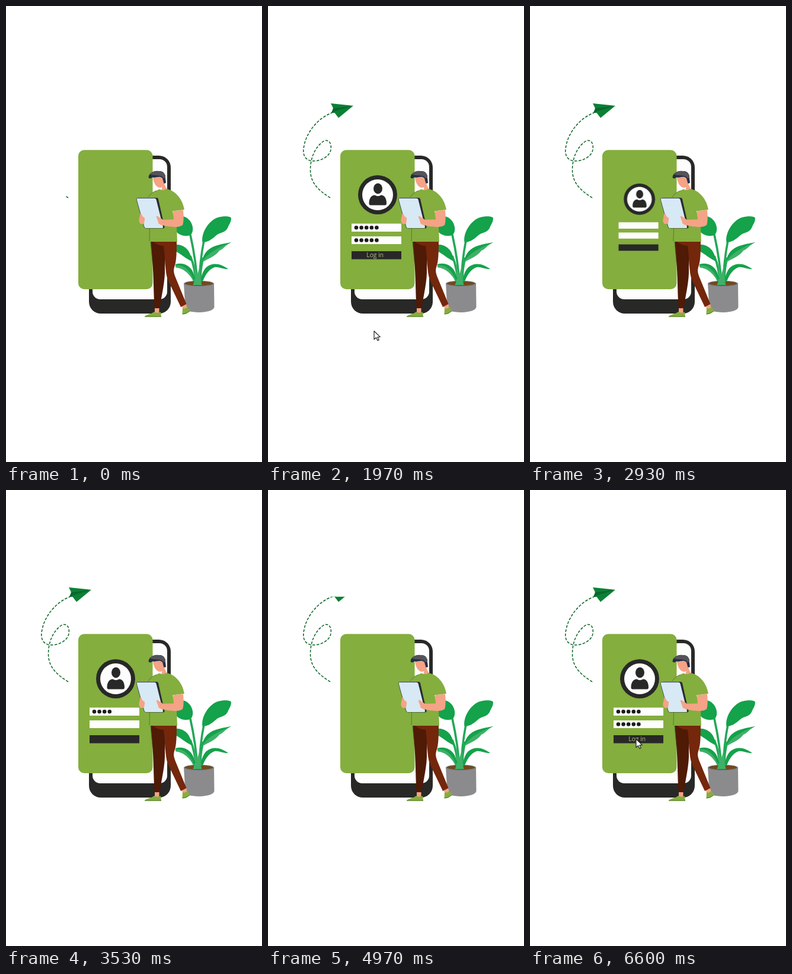
These frames come from a looping animation (432 px wide and 768 px high, 6.71 s). An HTML page without scripts:

```html
<!DOCTYPE html>
<html lang="en">
<head>
<meta charset="utf-8">
<title>Log in</title>
<style>
  html, body { margin: 0; width: 100%; height: 100%; overflow: hidden; background: #fff; }
  svg { display: block; width: 100%; height: 100%; }

  /* every moving part shares one cycle */
  .wipe, .form, .cover, .late, .cursor {
    animation: calc(6710ms / 3) linear infinite;
  }
  .wipe { animation-name: wipe; }
  .form { animation-name: zoom; transform-origin: 183.3px 355px; }
  .cover { transform-origin: 189px 0; animation-timing-function: step-end; }
  .user { animation-name: user; }
  .pass { animation-name: pass; }
  .late { animation-name: show; animation-timing-function: step-end; }
  .cursor { animation-name: rise; }

  @keyframes wipe {
    0%, 2% { transform: translateY(160.5px); }
    25.1%, 100% { transform: none; }
  }
  @keyframes zoom {
    0%, 25% { transform: scale(0); animation-timing-function: steps(5); }
    32.4%, 100% { transform: none; }
  }
  @keyframes user {
    0% { transform: none; }
    39.9% { transform: scaleX(.8); }
    47.1% { transform: scaleX(.6); }
    53.4% { transform: scaleX(.4); }
    57.8% { transform: scaleX(.2); }
    65.1%, 100% { transform: scaleX(0); }
  }
  @keyframes pass {
    0% { transform: none; }
    65.1% { transform: scaleX(.8); }
    71.3% { transform: scaleX(.6); }
    75.7% { transform: scaleX(.4); }
    83% { transform: scaleX(.2); }
    88%, 100% { transform: scaleX(0); }
  }
  @keyframes show {
    0% { opacity: 0; }
    88%, 100% { opacity: 1; }
  }
  @keyframes rise {
    0%, 88% { transform: translateY(128px); animation-timing-function: cubic-bezier(.76, 0, .24, 1); }
    95.3%, 100% { transform: none; }
  }

  .ink { fill: #282827; }
  .lime { fill: #84ae3e; }
  .skin { fill: #f4a386; }
  .leaf { fill: #14a24b; }
  .pale { fill: #3fb068; }
  .stem { fill: none; stroke: #22a857; stroke-width: 3.6; }
  .dots { fill: none; stroke: #1c1c1b; stroke-width: 6.6; stroke-linecap: round; stroke-dasharray: 0 8.6; }
  text { font: 10.3px "Open Sans", "Noto Sans", sans-serif; fill: #b0c484; text-anchor: middle; }
</style>
</head>
<body>
<svg viewBox="0 0 432 768">
  <defs>
    <clipPath id="reveal"><rect class="wipe" x="50" y="160" width="110" height="170"/></clipPath>
  </defs>

  <!-- paper plane and its trail -->
  <g clip-path="url(#reveal)">
    <path d="M105 323C88 312 71.500 300 71.500 276C71.500 255 80 238 92 229C101 222 108 230 106 242C104 254 88 262 74 261C60 259 58 247 61 235C65 213 84 188 110 179"
          fill="none" stroke="#0a6325" stroke-width="1.5" stroke-dasharray="4.5 2.5"/>
    <path d="M106 164L144 168L110 175L109.500 171Z" fill="#0b8035"/>
    <path d="M110 172.500L144 168L113 180L107 179.500Z" fill="#07682a"/>
    <path d="M111 178L144 168L119 188.500Z" fill="#0b8035"/>
  </g>

  <!-- phone and card -->
  <rect class="ink" x="140" y="252" width="138" height="266" rx="20"/>
  <rect x="146" y="258" width="126" height="236" rx="13" fill="#fdfdfd"/>
  <rect class="lime" x="122" y="242.500" width="125.500" height="234.500" rx="10"/>

  <!-- login form -->
  <g class="form">
    <circle class="ink" cx="185" cy="318" r="33"/>
    <circle cx="185" cy="318" r="26" fill="#fdfdfd"/>
    <ellipse class="ink" cx="185.500" cy="307.500" rx="7.500" ry="9"/>
    <path class="ink" d="M173 335.500Q170.500 335.500 170.500 332C170.500 323 175 319 180 318.500Q185.500 322 191 318.500C196 319 200 323 200 332Q200 335.500 197.500 335.500Z"/>
    <path d="M141 366.500h84v13.500h-84zM141 388h84v13h-84z" fill="#fdfdfd"/>
    <path class="ink" d="M141 413h84v13.500h-84z"/>
    <path class="dots" d="M149 373.200h35M149 394.500h35"/>
    <rect class="cover user" x="145" y="369" width="44" height="8.500" fill="#fdfdfd"/>
    <rect class="cover pass" x="145" y="390" width="44" height="9" fill="#fdfdfd"/>
    <text class="late" x="180.700" y="423">Log in</text>
  </g>

  <!-- plant -->
  <path class="stem" d="M311 385Q321 430 323 470M334 395Q327 430 326 470"/>
  <path class="stem" d="M311 421Q319 440 321 470M333 424Q327 445 328 470"/>
  <path class="pale" d="M315 470Q319 452 318 438L323 452L327 438Q328 455 331 470Z"/>
  <path class="leaf" d="M312 385C306 389 294 388 286 379L286 356C298 351 308 356 313 366C317 375 315 382 312 385Z"/>
  <path class="leaf" d="M331.500 398C329 382 342 361 358 356C368 353 379 354 380 357C380 365 376 368 374 374C369 383 362 380 354 387C346 394 340 398 331.500 398Z"/>
  <path class="leaf" d="M286 401.500C300 402 312 410 313.500 430C304 426 296 418 286 413Z"/>
  <path class="pale" d="M380 398C368 401 350 402 340 412C335 417 332 424 330 432C343 425 355 420 360 412C366 410 370 403 380 398Z"/>
  <path class="leaf" d="M380 398C368 401 350 402 340 412C335 417 332 424 330 432C338 418 355 408 380 398Z"/>
  <path class="leaf" d="M286 435C298 431 311 437 316 449C319 458 322 464 322 470L318 470C314 455 306 443 286 440Z"/>
  <path class="pale" d="M286 437C300 435 313 446 320 470C312 454 302 442 286 440Z"/>
  <path class="leaf" d="M375 443C362 434 350 431 338 440C331 447 329 458 326 470L330 470C335 453 343 443 352 440C360 439 367 444 375 443Z"/>
  <path d="M300 467L302.500 508Q303 515.500 326 516Q350 515 351.500 507L351 467Z" fill="#8b8b8e"/>
  <ellipse cx="325.500" cy="467.500" rx="25.500" ry="4.800" fill="#77777a"/>
  <ellipse cx="325.500" cy="467.300" rx="23.500" ry="3.600" fill="#704a1e"/>
  <path class="pale" d="M315.500 470Q318 464 318 460H329Q329 465 330.500 470Z"/>

  <!-- man: legs and shoes -->
  <path class="skin" d="M251 507h7.500v10h-7.500zM296 504l8-3 2 9-7 2z"/>
  <path d="M244 396H270L268 440C269 465 262 488 259.500 509H250.500C249 480 249 450 247 430Z" fill="#4f1a06"/>
  <path d="M247 396H288C288 412 288 430 284 440C282 446 284 452 286 457L304.500 502L295 507L273 461C268 447 269 425 266 404Q254 403 247 396Z" fill="#74270b"/>
  <path class="lime" d="M234 523.500C236 519 246 519 250 515C254 517 258 517 261 515L262 523.500Z"/>
  <path class="lime" d="M297.500 519L298 509Q302 511 306 507L311 513C307 517 302 520 297.500 519Z"/>
  <path d="M234 523h28M297.500 519Q304 519 310.500 513.500" fill="none" stroke="#4f7424"/>

  <!-- man: head, shirt -->
  <path class="skin" d="M248 287L265 286L267 297C267.500 302 270 306 272 309L262 312L263.500 305C255 309 248.500 299 248 287Z"/>
  <path d="M240.500 289C241 281 250 277 257 278C265 277 270 283 269 290L270 298L266.500 299L264 290C259 285 252 290 247 288.500Q243 292 240.500 289Z" fill="#262d45"/>
  <path d="M243 284C246 279 251 278 257 278C265 277 270 283 269 290L266 290C262 284 252 286 243 284Z" fill="#54545a"/>
  <path class="lime" d="M240 322C244 315 253 311 259 308.500Q265 312 271 308C286 311 298 325 301 343L281 345.500L288 372L289 397H242L243 370Z"/>
  <path d="M240 322Q245 314 254 311M242.500 375L242 396M244 397L247 430" fill="none" stroke="#4f6f28" stroke-width=".8"/>

  <!-- man: tablet and arms -->
  <path d="M223 323H254Q256.500 323 257 325L267.500 372Q268 374.500 265 374.500H236Z" fill="#2b2b31"/>
  <path d="M222 324H251Q253 324 253.500 326L265 372Q265.500 374 263.500 374H236Q234 374 233.500 372L220.500 326Q220 324 222 324Z" fill="#d7e9f5"/>
  <path d="M235 374Q233.500 374 233 372L220.200 326Q220 323.600 222 323.600H250" fill="none" stroke="#4c545c" stroke-width=".9"/>
  <path class="skin" d="M281.500 345.500L299 343.500C300 355 300 364 298 369C290 375 272 371 265 369.500C260 369 256 366 257 364L254 356Q253 353 256 354L265 360L283 359.500Z"/>
  <path class="skin" d="M227 348L231 355Q235 356 234 360L233 367H227Q223 363 225 357Z"/>

  <!-- pointer -->
  <g class="late">
    <path class="cursor" d="M179 419.500V433.500L182.500 430.500L185 435.500L187.200 434.500L184.900 429.700L189.300 429.400Z"
          fill="#fff" stroke="#222" stroke-width="1.200" stroke-linejoin="round"/>
  </g>
</svg>
</body>
</html>
```
